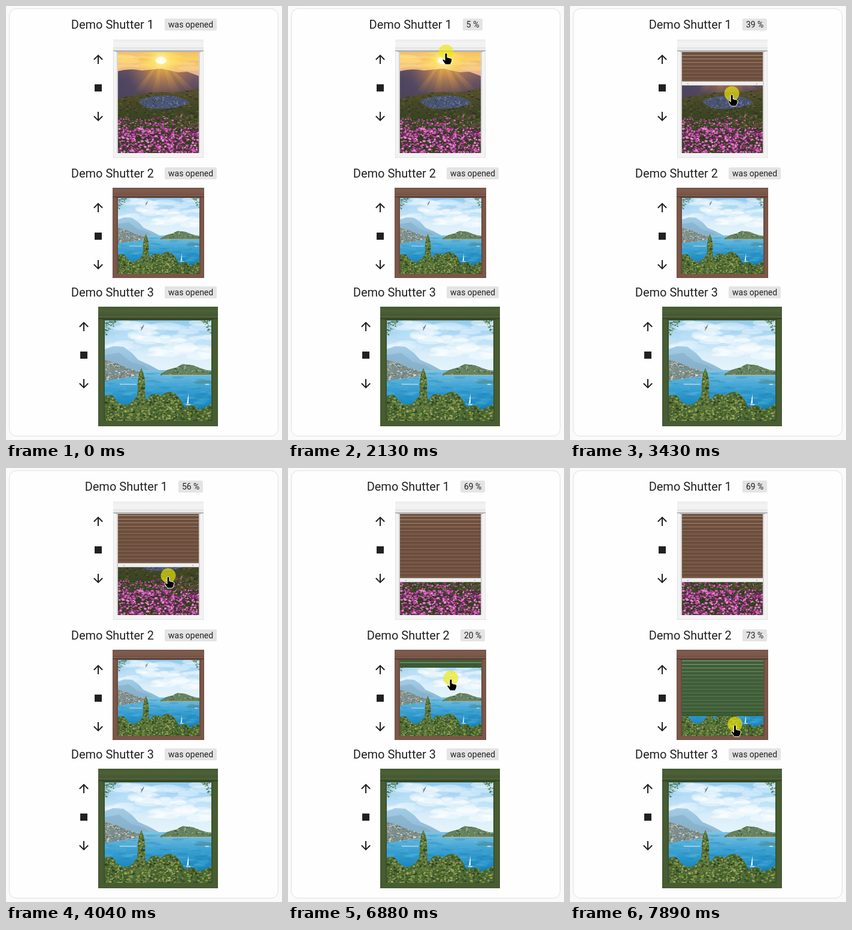
Animation of 461x726 px, one loop 8 s. Source, as an HTML page with a canvas:

```html
<!DOCTYPE html>
<html lang="en">
<head>
<meta charset="utf-8">
<title>Shutters</title>
<style>
  html, body { margin: 0; width: 100%; height: 100%; overflow: hidden; background: #fafafa; }
  canvas { position: absolute; left: 0; top: 0; }
  header {
    position: absolute; left: 0; width: 461px; height: 20px; display: flex; justify-content: center;
    gap: 18px; font: 20px/20px Roboto, sans-serif; color: #212121; white-space: nowrap;
  }
  header b { font-weight: 400; font-size: 14px; padding: 0 6px; background: #e4e4e4; border-radius: 2px; }
</style>
</head>
<body>
<canvas id="view" width="461" height="726"></canvas>
<header style="top:21px"><span>Demo Shutter 1</span><b>was opened</b></header>
<header style="top:270px"><span>Demo Shutter 2</span><b>was opened</b></header>
<header style="top:469px"><span>Demo Shutter 3</span><b>was opened</b></header>
<script>
const view = document.getElementById('view').getContext('2d');
const badges = document.querySelectorAll('header b');
const backdrop = document.createElement('canvas');
backdrop.width = 461;
backdrop.height = 726;
const g = backdrop.getContext('2d');

let seed = 7;
const random = () => (seed = seed * 16807 % 2147483647) / 2147483647;

function rect(c, color, x, y, w, h) {
  c.fillStyle = color;
  c.fillRect(x, y, w, h);
}

function ellipse(c, color, x, y, rx, ry = rx) {
  c.fillStyle = color;
  c.beginPath();
  c.ellipse(x, y, rx, ry, 0, 0, 7);
  c.fill();
}

function spread(gradient, colors) {
  colors.forEach((color, i) => gradient.addColorStop(i / (colors.length - 1), color));
  return gradient;
}

const vertical = (c, y0, y1, ...colors) => spread(c.createLinearGradient(0, y0, 0, y1), colors);
const radial = (c, x, y, r, ...colors) => spread(c.createRadialGradient(x, y, 0, x, y, r), colors);

function shape(path, color) {
  const p = new Path2D(path);
  g.fillStyle = color;
  g.fill(p);
  return p;
}

// Random dabs of colour, kept inside an optional outline.
function dabs(count, [x, y, w, h], colors, size, outline, flatness = 0.75) {
  g.save();
  if (outline) g.clip(outline);
  for (let i = 0; i < count; i++) {
    const color = colors[Math.floor(random() * colors.length)];
    const r = size * (0.4 + random() * 0.8);
    ellipse(g, color, x + random() * w, y + random() * h, r, r * flatness);
  }
  g.restore();
}

// 135 x 169: sunset above a flowering meadow.
function meadow() {
  rect(g, vertical(g, 0, 36, '#f5c062', '#fad068', '#f2c17e', '#e9b394'), 0, 0, 135, 40);
  dabs(26, [0, 0, 135, 30], ['#f3bd9066', '#dfa27a55', '#ffe08a66'], 18, null, 0.2);
  rect(g, radial(g, 72, 14, 42, '#fff9b8', '#ffe66acc', '#ffd85566', '#ffd04000'), 0, 0, 135, 60);
  ellipse(g, '#fffef0', 72, 14, 9, 6);

  const hills = shape('M0 32Q20 27 40 31L72 28L100 34L116 33L135 40V90H0Z',
    vertical(g, 28, 86, '#8f6a60', '#6b5463', '#56475a', '#474335'));
  g.save();
  g.clip(hills);
  rect(g, radial(g, 0, 50, 62, '#45405fcc', '#4c456399', '#4c456300'), 0, 28, 70, 60);
  rect(g, radial(g, 74, 26, 58, '#f6b84ccc', '#c98a4a77', '#b0784500'), 0, 28, 135, 60);
  for (const [x, w] of [[30, 7], [62, 6], [98, 9], [128, 8]])
    shape(`M72 10L${x - w} 72H${x + w}Z`, vertical(g, 30, 72, '#f4bb4855', '#d4944500'));
  g.restore();

  const slope = shape('M0 78Q40 68 70 67Q108 70 135 59V169H0Z',
    vertical(g, 64, 120, '#57502f', '#434626', '#344320'));
  dabs(420, [0, 62, 135, 58], ['#59592b', '#353a20', '#665f33', '#3d4b24', '#2f3320'], 2.6, slope, 0.35);
  const rocks = new Path2D('M34 82Q54 72 83 73Q112 75 120 86Q94 96 62 95Q42 94 34 82Z');
  g.fillStyle = '#4a5574';
  g.fill(rocks);
  dabs(300, [34, 70, 86, 27], ['#6d7ba1', '#343d58', '#8490ad', '#535f8c', '#3c4238'], 1.1, rocks);

  const flowers = shape('M0 108Q34 116 70 108Q106 102 135 107V169H0Z', '#37401f');
  dabs(1000, [0, 102, 135, 40], ['#a63a8e', '#c654ad', '#7a2c66', '#d878c2', '#29381b', '#3e5422', '#46562a'], 1.7, flowers);
  dabs(900, [0, 128, 135, 41], ['#c940aa', '#de62c3', '#942f7f', '#ea8cd6', '#2b3320', '#5a2850'], 1.9, flowers);
  dabs(130, [85, 107, 50, 20], ['#3f4c22', '#51582a', '#333f1e'], 2.2, flowers);
}

// 178 x 168: a bay with an island and trees in front.
function bay() {
  rect(g, vertical(g, 0, 84, '#8fcaef', '#b5dcf5', '#d9eefa', '#e6f4fb'), 0, 0, 178, 86);
  dabs(60, [20, 2, 158, 46], ['#ffffff66', '#f4fbff66', '#c4e4f766'], 22, null, 0.25);
  dabs(24, [50, 26, 128, 34], ['#ffffff66'], 20, null, 0.3);
  shape('M0 48L14 43L31 44L46 55L56 66L74 74L94 85H0Z', vertical(g, 43, 85, '#a3cbe6', '#8db9d4'));
  shape('M0 58L24 54L43 69L66 76L78 85H0Z', '#82abc388');
  rect(g, vertical(g, 82, 168, '#82c5e2', '#3fa3d3', '#1c89c0', '#177fb2'), 0, 83, 178, 85);
  dabs(140, [0, 88, 178, 62], ['#4fb0d855', '#1679ad44', '#6cc3e244'], 9, null, 0.2);

  const town = shape('M0 66L18 71L37 79L59 86L57 93L27 97L0 101Z', '#7b8d8b');
  dabs(330, [0, 66, 60, 36], ['#dcdfda', '#aeb5ae', '#6b7f6b', '#c3b8a2', '#5d7474', '#8fa0a0'], 1.4, town);
  rect(g, '#b9d5dd', 25, 106, 28, 1.5);
  const island = shape('M93 90Q104 81 119 79L130 73L147 75L163 81L178 85V92H93Z', '#66825f');
  dabs(200, [92, 72, 86, 20], ['#55724f', '#7b9367', '#a0aa8c', '#638063', '#456149'], 1.5, island);
  rect(g, '#a5bcad', 96, 91, 82, 1.2);
  shape('M148 103Q166 98 178 101V106H153Z', '#4d96a8');
  shape('M140 122V139H137Z', '#ecf7fb');
  rect(g, '#d5e9f0', 136, 140, 7, 1.5);
  rect(g, '#d7eef5', 168, 106, 6, 1.5);

  const greens = ['#3d5a2a', '#64803a', '#869748', '#2b4326', '#a3a962', '#527038', '#788a52'];
  const bushes = shape('M0 127Q12 120 18 132Q28 146 43 139L54 127L72 132Q77 118 94 126Q108 114 119 124' +
    'Q128 132 133 146Q149 137 158 150L178 140V168H0Z', '#4a652f');
  dabs(1300, [0, 112, 178, 56], greens, 2, bushes);
  const cypress = shape('M61 80Q69 95 67 116L70 168H51L55 116Q54 94 61 80Z', '#566f34');
  dabs(330, [50, 80, 21, 88], greens, 1.7, cypress);
  const leaves = new Path2D('M0 0H21L14 8L18 13L7 17L4 25H0ZM160 0H178V22L171 18L169 8Z');
  for (const x of [0, 156])
    dabs(90, [x, 0, 22, 26], ['#5b8560', '#78996f88', '#477053'], 1.6, leaves);
  shape('M58 8L61 12L66 6L64 12L60 18L61 13Z', '#74818a');
}

const windows = [
  { x: 179, y: 56, w: 151, h: 198, box: 20, color: '#f3f3f3', glass: [187, 77, 135, 169], scene: meadow, size: [135, 169],
    slat: '#70503f', line: '#b39679', bar: '#eeeeee', icons: [154, 89] },
  { x: 178, y: 304, w: 153, h: 151, box: 16, color: '#7b5749', glass: [187, 321, 136, 127], scene: bay, size: [178, 168],
    slat: '#416039', line: '#83a583', bar: '#3d5c32', icons: [154, 337] },
  { x: 154, y: 503, w: 200, h: 200, box: 21, color: '#475c32', glass: [165, 526, 178, 168], scene: bay, size: [178, 168],
    icons: [130, 536] }
];

function drawFrame({ x, y, w, h, box, color, glass: [gx, gy, gw, gh] }) {
  rect(g, color, x, y, w, h);
  rect(g, '#0001', x, y + box, 1, h - box);
  rect(g, '#0001', x + w - 1, y + box, 1, h - box);
  rect(g, '#0001', x, y + h - 1, w, 1);
  rect(g, '#0002', gx - 2, gy, 2, gh);
  rect(g, '#0002', gx + gw, gy, 2, gh);
  rect(g, vertical(g, y, y + box, '#00000008', '#ffffff08', '#0000', '#0001'), x, y, w, box);
  rect(g, '#0002', x, y + box * 0.68, w, 1);
  rect(g, '#ffffff10', x, y + box * 0.68 + 1, w, 2);
  rect(g, '#0003', x, y + box - 2, w, 2);
  rect(g, '#0004', gx - 4, y + box, gw + 8, 1);
}

function drawIcons([x, y]) {
  const arrow = 'M13,20H11V8L5.5,13.5L4.08,12.08L12,4.16L19.92,12.08L18.5,13.5L13,8Z';
  for (const [dy, flip] of [[0, 1], [96, -1]]) {
    g.save();
    g.translate(x, y + dy);
    g.scale(1, flip);
    g.translate(-12, -12);
    shape(arrow, '#212121');
    g.restore();
  }
  rect(g, '#212121', x - 6, y + 42, 12, 12);
}

function drawBackdrop() {
  rect(g, '#fafafa', 0, 0, 461, 726);
  g.beginPath();
  g.roundRect(5.5, 4.5, 449, 715, 12);
  g.fillStyle = '#fefefe';
  g.fill();
  g.strokeStyle = '#e0e0e0';
  g.stroke();
  for (const win of windows) {
    const [x, y, w, h] = win.glass;
    drawFrame(win);
    drawIcons(win.icons);
    g.save();
    g.beginPath();
    g.rect(x, y, w, h);
    g.clip();
    g.translate(x, y);
    g.scale(w / win.size[0], h / win.size[1]);
    seed = 7;
    win.scene();
    g.restore();
  }
}

function drawShutter({ glass: [x, y, w], slat, line, bar }, bottom) {
  if (bottom <= y) return;
  view.save();
  view.beginPath();
  view.rect(x, y, w, bottom - y);
  view.clip();
  rect(view, slat, x, y, w, bottom - y);
  for (let s = bottom - 9; s > y - 2; s -= 6) {
    view.globalAlpha = Math.max(0.3, 0.9 - (s - y) / 55);
    rect(view, line, x, s, w, 1.5);
    view.globalAlpha = 1;
    rect(view, '#0003', x, s + 1.5, w, 1);
  }
  rect(view, bar, x, bottom - 7, w, 7);
  rect(view, '#0002', x, bottom - 7, w, 1);
  rect(view, '#0003', x + 9, bottom - 4, 2, 2);
  rect(view, '#0003', x + w - 11, bottom - 4, 2, 2);
  rect(view, '#0002', x, bottom - 1, w, 1);
  view.restore();
}

const hand = new Path2D('M-2 2Q0 -1 2 2V8L8 9.5Q10 10 10 12L9 16L7 20H-1L-6 13Q-6 10 -3 11.5L-2 13Z');

function drawCursor(x, y, pressed) {
  if (pressed) ellipse(view, 'rgba(238,232,10,.66)', x, y, 12.5);
  view.save();
  view.translate(x, y + 1);
  view.fillStyle = '#000';
  view.strokeStyle = '#fff';
  view.fill(hand);
  view.stroke(hand);
  view.restore();
}

// Screen updates come in bursts: start, end, number of steps.
const bursts = [[500, 1500, 8], [1840, 2850, 8], [3000, 4040, 8], [4170, 4730, 5],
  [5160, 6160, 8], [6310, 7290, 8], [7440, 7890, 4]];

// Pointer path: time, x, y.
const path = [[500, 450, 42], [1500, 262, 67], [1840, 263, 67], [2130, 264, 77], [2700, 270, 116],
  [2850, 270, 127], [3000, 270, 133], [4040, 271, 180], [4170, 271, 184], [4730, 272, 205],
  [5160, 272, 204], [5870, 289, 342], [6160, 271, 323], [6310, 271, 324], [6880, 272, 352],
  [7290, 274, 404], [7440, 275, 409], [7890, 275.5, 428.5]];

function steppedTime(t) {
  const burst = bursts.findLast(([start]) => t >= start);
  if (!burst) return 0;
  const [start, end, count] = burst;
  const step = (end - start) / (count - 1);
  return start + Math.min(count - 1, Math.floor((t - start + 8) / step)) * step;
}

function pointerAt(t) {
  const i = path.findIndex(([time]) => time >= t - 0.01);
  if (i < 1) return path[i < 0 ? path.length - 1 : 0].slice(1);
  const [t0, x0, y0] = path[i - 1], [t1, x1, y1] = path[i];
  const u = (t - t0) / (t1 - t0);
  return [x0 + (x1 - x0) * u, y0 + (y1 - y0) * u];
}

function setBadge(i, percent) {
  const label = percent < 0.7 ? 'was opened' : Math.floor(percent + 0.25) + ' %';
  if (badges[i].textContent !== label) badges[i].textContent = label;
}

function render() {
  const t = steppedTime(performance.now() % 8000);
  const [x, y] = pointerAt(t);
  const first = t < 1840 ? 0 : t < 4730 ? (y - 67) / 2 : 69;
  const second = t < 6310 ? 0 : (y - 323) / 1.44;
  view.drawImage(backdrop, 0, 0);
  drawShutter(windows[0], Math.round(54 + first * 2 - 0.6));
  drawShutter(windows[1], Math.round(304 + second * 1.51));
  setBadge(0, first);
  setBadge(1, second);
  if (t >= 500) drawCursor(x, y, t >= 1840 && t < 5160 || t >= 6310);
  requestAnimationFrame(render);
}

drawBackdrop();
render();
</script>
</body>
</html>
```
